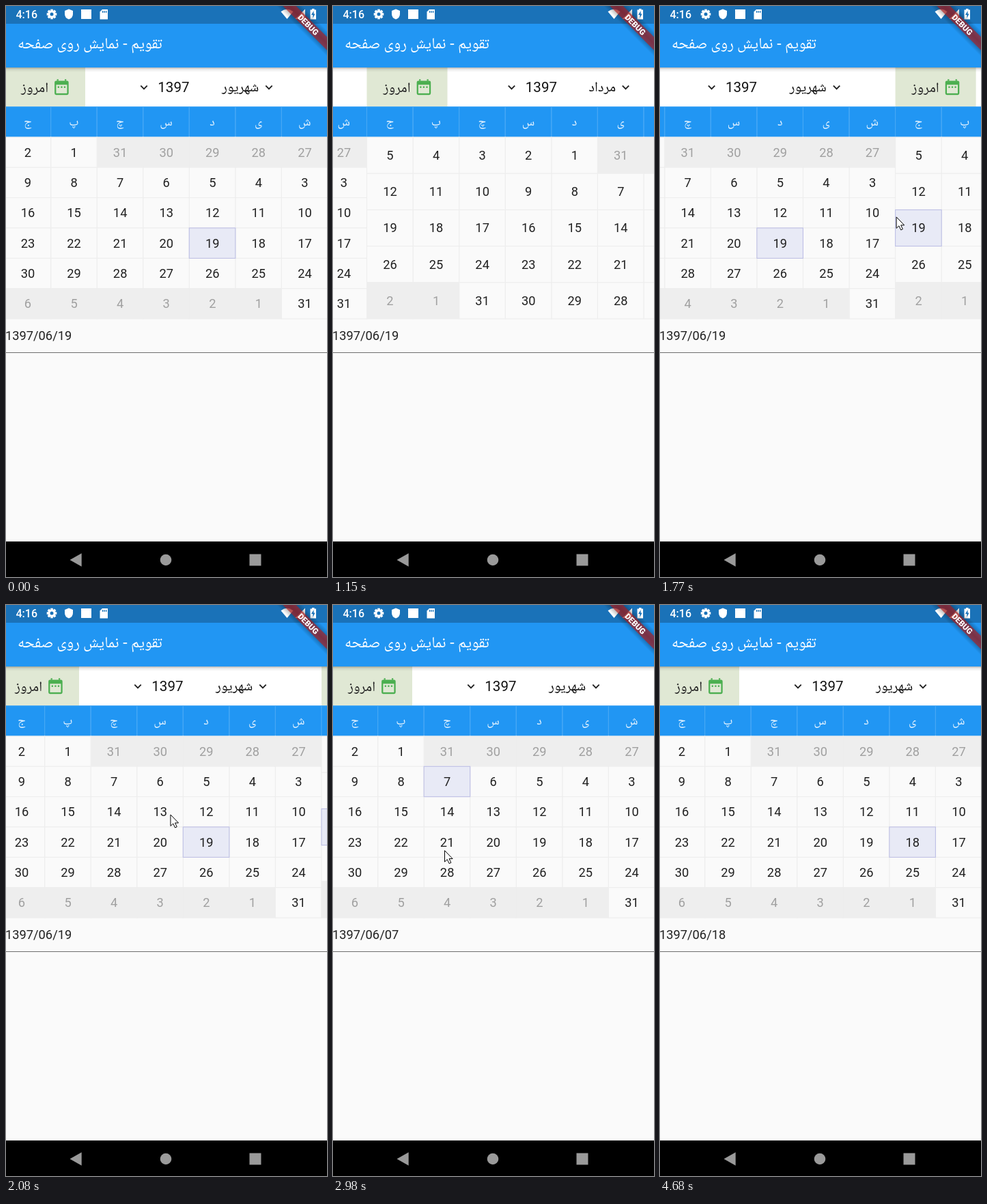
These frames come from a looping animation (470x836 px, 5.53 s). An HTML page with a canvas:

```html
<!DOCTYPE html>
<html lang="fa">
<head>
<meta charset="utf-8">
<title>Calendar</title>
<style>
html, body { margin: 0; width: 100%; height: 100%; overflow: hidden; background: #fafafa; }
canvas { display: block; }
</style>
</head>
<body>
<canvas id="stage" width="470" height="836"></canvas>
<script>
const ctx = document.getElementById('stage').getContext('2d');
const LOOP = 5530, STEP = 76.72, LAST = 61;
const DP = 1.1425, SMALL = 16 * DP, MEDIUM = 18 * DP, LARGE = 20 * DP;
const PAGE_W = 473, COL = PAGE_W / 7, GRID_TOP = 192, GRID_H = 266;
const BLUE = '#2196f3', INK = '#212121', LINE = '#eeeeee', WHITE = '#ffffff';
const LATIN = 'Roboto, sans-serif';
const ARABIC = '"Noto Naskh Arabic", "Noto Sans Arabic", "DejaVu Sans", sans-serif';
const DAYS = [...'جپچسدیش'];
const SHAHRIVAR = { name: 'شهریور', nameX: 318, lead: 5, rows: 6, inset: 0 };
const MORDAD = { name: 'مرداد', nameX: 325, lead: 2, rows: 5, inset: 8 };

// pointer moves: from step, to step, target x, y
const MOVES = [
  [0, 8, 385, 337],    // enter
  [9, 14, 15, 320],    // swipe left
  [14, 15, -20, 310],
  [18, 25, 436, 308],  // swipe right
  [25, 28, 172, 306],
  [29, 32, 167, 262],  // pick days
  [36, 39, 163, 359],
  [43, 49, 345, 324],
  [52, 54, 370, 345],
  [54, 57, 397, 440],  // leave
  [57, 61, 285, 850]
];
// selected day from a step on
const PICKS = [[0, 19], [34, 7], [42, 21], [51, 11], [53, 18]];

function rect(x, y, w, h, color) {
  ctx.fillStyle = color;
  ctx.fillRect(x, y, w, h);
}

function box(x, y, w, h, color) {
  ctx.strokeStyle = color;
  ctx.lineWidth = 1.1;
  ctx.strokeRect(x, y, w, h);
}

function text(str, x, y, size, color, align = 'left', family = LATIN, weight = 400) {
  ctx.font = `${weight} ${size}px ${family}`;
  ctx.textAlign = align;
  ctx.fillStyle = color;
  ctx.fillText(str, x, y);
}

function fillPath(path, color) {
  ctx.fillStyle = color;
  ctx.fill(new Path2D(path));
}

function disc(x, y, r, color) {
  ctx.beginPath();
  ctx.arc(x, y, r, 0, Math.PI * 2);
  ctx.fillStyle = color;
  ctx.fill();
}

function chevron(x, y) {
  ctx.beginPath();
  ctx.moveTo(x - 4.7, y - 2.3);
  ctx.lineTo(x, y + 2.4);
  ctx.lineTo(x + 4.7, y - 2.3);
  ctx.strokeStyle = INK;
  ctx.lineWidth = 1.9;
  ctx.stroke();
}

function pointerAt(k) {
  let x = 325, y = 842;
  for (const [from, to, tx, ty] of MOVES) {
    const u = Math.min(1, Math.max(0, (k - from) / (to - from)));
    const e = u * u * (3 - 2 * u);
    x += (tx - x) * e;
    y += (ty - y) * e;
  }
  return [x, y];
}

// page offset follows the drag, then settles
function scrollAt(k, x) {
  if (k < 9) return 0;
  if (k <= 14) return x - 385;
  if (k < 19) return -PAGE_W + 103 * 0.5 ** (k - 14);
  if (k <= 25) return x + 1 - PAGE_W;
  return k < 31 ? -36 * 0.5 ** (k - 25) : 0;
}

function drawCells(month, left, picked) {
  const h = GRID_H / month.rows;
  let mark = null;
  for (let i = 0; i < month.rows * 7; i++) {
    const x = left + (6 - i % 7) * COL, y = GRID_TOP + Math.floor(i / 7) * h;
    const n = i - month.lead;
    const outside = n < 0 || n > 30;
    const day = (n + 31) % 31 + 1;
    const chosen = !outside && day === picked;
    if (chosen) mark = [x, y];
    rect(x, y, COL, h, chosen ? '#e8eaf6' : outside ? LINE : '#fafafa');
    box(x, y, COL, h, LINE);
    text(day, x + COL / 2 + 0.2, y + h / 2 + 6.35, SMALL, outside ? '#a0a0a0' : INK, 'center');
  }
  if (mark) box(...mark, COL, h, '#bdbfe6');
}

function drawTodayIcon(x, y) {
  const green = '#4caf50';
  ctx.save();
  ctx.translate(x, y);
  ctx.scale(DP, DP);
  ctx.beginPath();
  ctx.roundRect(3, 4, 18, 18, 2);
  ctx.fillStyle = green;
  ctx.fill();
  rect(6, 2, 2, 2, green);
  rect(16, 2, 2, 2, green);
  rect(5, 9, 14, 11, '#e0e8d4');
  for (let i = 0; i < 3; i++) rect(7 + i * 4, 11, 2, 2, green);
  ctx.restore();
}

function drawPage(month, left, picked) {
  if (left > 470 || left + PAGE_W < 0) return;
  const s = month.inset;
  rect(left, 90, PAGE_W, 58, WHITE);
  rect(left, 90, 118, 58, '#e0e8d4');
  text('امروز', left + 64, 126, MEDIUM, INK, 'right', ARABIC);
  drawTodayIcon(left + 69.7, 105);
  chevron(left + 204 + s, 119);
  text('1397', left + 224.3 + s, 126, MEDIUM, '#111111');
  text(month.name, left + month.nameX, 125, MEDIUM, '#111111', 'left', ARABIC);
  chevron(left + 387 - s, 119);

  rect(left, 147.6, PAGE_W, 44.4, BLUE);
  DAYS.forEach((d, i) => {
    box(left + i * COL, 147.6, COL, 44.2, '#47a8f5');
    text(d, left + (i + 0.5) * COL, 175, SMALL, '#e6f3fe', 'center', ARABIC);
  });
  drawCells(month, left, picked);
}

function drawStatus() {
  const bar = '#1a72b8';
  rect(0, 0, 470, 26, bar);
  text('4:16', 14.5, 18, 14 * DP, WHITE, 'left', LATIN, 500);
  for (let i = 0; i < 8; i++) {
    ctx.save();
    ctx.translate(67, 12);
    ctx.rotate(i * Math.PI / 4);
    rect(-1.8, -7.3, 3.6, 4, WHITE);
    ctx.restore();
  }
  disc(67, 12, 5.7, WHITE);
  disc(67, 12, 2.5, bar);
  fillPath('M92 4.5l6 2.5v4.5q0 6-6 8q-6-2-6-8V7z', WHITE);
  rect(110, 5, 15, 14, WHITE);
  fillPath('M141 5h8v14.5h-11.5v-11z', WHITE);
  for (let i = 0; i < 3; i++) rect(141 + i * 2.5, 7, 1.3, 3, bar);
  fillPath('M402.5 8.2q9-6.7 18 0l-9 10.8z', WHITE);
  fillPath('M438 4.5V19h-14.5z', WHITE);
  rect(445.5, 5.5, 8.5, 14, WHITE);
  rect(448, 4, 3.5, 2, WHITE);
  fillPath('M450.6 7l-3.6 6h2.3v5l3.2-6.4h-2z', bar);
}

function drawBanner() {
  ctx.save();
  ctx.translate(470, 0);
  ctx.rotate(Math.PI / 4);
  ctx.scale(DP, DP);
  const shade = ctx.createLinearGradient(0, 22, 0, 46);
  shade.addColorStop(0, 'rgba(0,0,0,0)');
  shade.addColorStop(0.25, 'rgba(0,0,0,.24)');
  shade.addColorStop(0.5, 'rgba(0,0,0,.42)');
  shade.addColorStop(0.75, 'rgba(0,0,0,.24)');
  shade.addColorStop(1, 'rgba(0,0,0,0)');
  rect(-48, 22, 96, 24, shade);
  rect(-42, 28, 84, 12, 'rgba(183,28,28,.63)');
  text('DEBUG', 0, 37.6, 10.2, WHITE, 'center', LATIN, 900);
  ctx.restore();
}

function drawAppBar() {
  const fade = ctx.createLinearGradient(0, 90, 0, 97);
  fade.addColorStop(0, 'rgba(0,0,0,.28)');
  fade.addColorStop(0.4, 'rgba(0,0,0,.08)');
  fade.addColorStop(1, 'rgba(0,0,0,0)');
  rect(0, 90, 470, 7, fade);
  rect(0, 26, 470, 64, BLUE);
  text('تقویم - نمایش روی صفحه', 17, 62, LARGE, WHITE, 'left', ARABIC);
  drawStatus();
  drawBanner();
}

function drawNav() {
  const grey = '#9a9a9a';
  rect(0, 784, 470, 52, '#000000');
  fillPath('M93.5 811l17.2-9.8v19.6z', grey);
  disc(234, 811, 8.3, grey);
  rect(356.5, 802.5, 17, 17, grey);
}

function drawPointer(x, y) {
  const arrow = new Path2D('M0 0V16.5L3.8 13 6.6 19 9.3 17.8 6.6 12H11.6Z');
  ctx.save();
  ctx.translate(x + 0.5, y + 0.5);
  ctx.fillStyle = WHITE;
  ctx.fill(arrow);
  ctx.strokeStyle = '#000000';
  ctx.lineWidth = 1;
  ctx.stroke(arrow);
  ctx.restore();
}

function draw(t) {
  const k = Math.min(LAST, Math.floor((t + 30) / STEP));
  const [px, py] = pointerAt(k);
  const left = scrollAt(k, px) - 2;
  const picked = PICKS.filter(p => p[0] <= k).pop()[1];
  rect(0, 0, 470, 836, '#fafafa');
  drawPage(SHAHRIVAR, left, picked);
  drawPage(MORDAD, left + PAGE_W, k < 18 ? 0 : 19);
  drawAppBar();
  text('1397/06/' + String(picked).padStart(2, '0'), -1, 489, SMALL, INK);
  rect(0, 507, 470, 1, '#6e6e6e');
  drawNav();
  drawPointer(px, py);
}

function tick(now) {
  draw(now % LOOP);
  requestAnimationFrame(tick);
}
draw(0);
requestAnimationFrame(tick);
</script>
</body>
</html>
```
